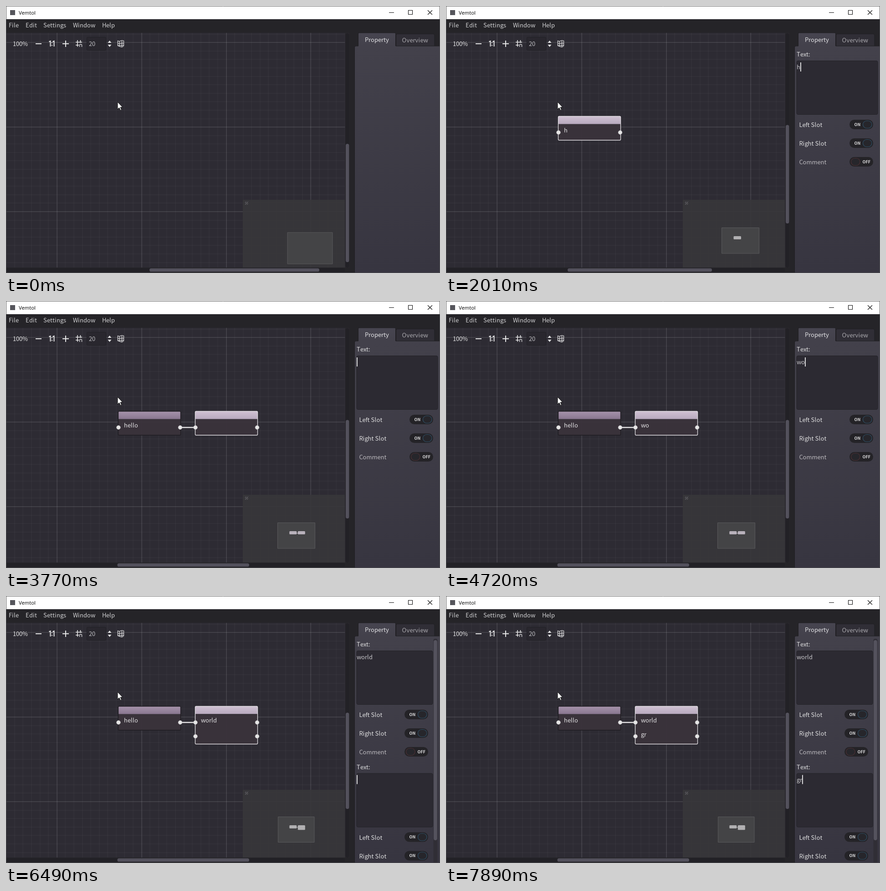
An HTML page with a canvas that plays this animation: 953 px wide and 587 px high, repeating every 8000 ms.

```html
<!DOCTYPE html>
<html lang="en">
<head>
<meta charset="utf-8">
<title>Node editor</title>
<style>
html, body { margin: 0; width: 100%; height: 100%; overflow: hidden; background: #252428; }
canvas { display: block; }
</style>
</head>
<body>
<canvas id="stage" width="953" height="587"></canvas>
<script>
const c = document.getElementById('stage').getContext('2d');
const UI = '"Noto Sans CJK SC", "Noto Sans CJK JP", "Noto Sans", sans-serif';
const LOOP = 8000, GRID = 18.585;
const SECOND_NODE = 3770, SECOND_SLOT = 6490;

// Times at which each letter appears
const words = {
  hello: [2010, 2210, 2350, 2550, 2810],
  world: [4440, 4720, 4920, 5180, 5440],
  gr: [7630, 7890]
};
const typed = (word, t) => word.slice(0, words[word].filter(k => t >= k).length);

function rect(x, y, w, h, fill) {
  c.fillStyle = fill;
  c.fillRect(x, y, w, h);
}

function round(x, y, w, h, r, fill, stroke, line = 1) {
  c.beginPath();
  c.roundRect(x, y, w, h, r);
  if (fill) { c.fillStyle = fill; c.fill(); }
  if (stroke) { c.strokeStyle = stroke; c.lineWidth = line; c.stroke(); }
}

function path(d, stroke, line = 1, fill) {
  const p = new Path2D(d);
  if (fill) { c.fillStyle = fill; c.fill(p); }
  if (stroke) { c.strokeStyle = stroke; c.lineWidth = line; c.stroke(p); }
}

function fade(y0, y1, from, to) {
  const g = c.createLinearGradient(0, y0, 0, y1);
  g.addColorStop(0, from);
  g.addColorStop(1, to);
  return g;
}

// Letters advance by whole pixels; returns the end of the text
function text(str, x, y, color = '#dededf') {
  c.font = '13px ' + UI;
  c.fillStyle = color;
  for (const ch of str) {
    c.fillText(ch, x, y);
    x += Math.round(c.measureText(ch).width);
  }
  return x;
}

function titleBar() {
  rect(0, 0, 953, 29, '#fff');
  rect(9, 9, 11, 11, '#55555b');
  c.font = '11.2px "Noto Sans", "Open Sans", sans-serif';
  c.fillStyle = '#111';
  c.fillText('Vemtol', 28, 19);
  path('M841 14.5h11M883.5 9.5h9v9h-9zM926 9.5l10 9.5M936 9.5l-10 9.5', '#111', 1.1);
}

function menuBar() {
  rect(0, 29, 953, 558, '#252428');
  [['File', 6], ['Edit', 43], ['Settings', 82], ['Window', 147], ['Help', 211]]
    .forEach(([s, x]) => text(s, x, 47, '#cfcfd1'));
}

function grid() {
  rect(1, 59, 743.5, 516, '#2d2b33');
  for (let i = -6; i < 35; i++) {
    const x = 111.8 + i * GRID, y = 80.3 + i * GRID;
    const color = i % 10 ? 'rgba(255,255,255,.05)' : 'rgba(255,255,255,.2)';
    if (x > 1 && x < 744) rect(Math.round(x) - .4, 59, 1, 516, color);
    if (y > 59 && y < 575) rect(1, Math.round(y) - .4, 743.5, 1, color);
  }
}

function toolbar() {
  const ink = '#e6e6e7';
  text('100%', 15, 88, ink);
  path('M65 83h13M124 83h14M131 76v14', ink, 2);
  path('M94.5 78.5l3-1.5v12M102.5 78.5l3-1.5v12', ink, 2);
  path('M100 79.5h2v2h-2zM100 85.5h2v2h-2z', null, 0, ink);
  path('M153 79.5h14M153 86h7M157 75v14.5M163.5 75v6', ink, 1.6);
  path('M161.5 90v-3.5a2.5 2.5 0 0 1 5 0v3.5', '#bdbdc0', 1.6);
  round(177.5, 68.5, 42, 29, 2, '#29272e', '#212025');
  text('20', 182, 88, '#bdbdc0');
  path('M223.5 81l4-5 4 5zM223.5 85l4 5 4-5z', null, 0, ink);
  path('M245.5 76.5q3 2 6 0q3-1.5 7 0v11q-3 4-7 2q-3-1.5-6-2z'
    + 'M245.5 82q3 1.5 6 0.5t7-.5M245.5 86.5q3 1.5 6 .5t7-.5M249.5 77.5v12M254.5 76.5v13', ink, 1.2);
}

function slot(x, y) {
  c.beginPath();
  c.arc(x, y, 4.3, 0, 7);
  c.fillStyle = '#e6e6e6';
  c.fill();
  c.strokeStyle = '#b9b7bb';
  c.lineWidth = .8;
  c.stroke();
}

function node(x, rows, selected) {
  const h = rows.length > 1 ? 83 : 52.5;
  round(x, 242.5, 137, h, 2, 'rgba(58,50,59,.94)');
  round(x, 242.5, 137, 17, [2, 2, 0, 0],
    selected ? fade(243, 260, '#cfc1d2', '#b7a8bd') : fade(243, 260, '#a592aa', '#88768f'));
  if (rows.length > 1) rect(x, 259.7, 137, 1, '#2a252c');
  round(x, 242.5, 137, h, 2, null, selected ? '#dedbdf' : '#1f1d22', 1.4);
  rows.forEach((row, i) => {
    const y = 278 + i * 30.5;
    slot(x + .5, y);
    slot(x + 136, y);
    text(row, x + 12.5, y, '#e0dfe1');
  });
}

function minimap(t) {
  const two = t >= SECOND_NODE, three = t >= SECOND_SLOT;
  rect(520, 426, 224.5, 149, 'rgba(56,55,58,.9)');
  path('M525 436.5l6.5-6M525 432.5l2.5-2M529 436.5l2.5-2.5', '#85848a');
  const view = t < 400 ? [618, 498, 99, 69] : three ? [597.5, 485.5, 79.5, 56]
    : [two ? 596.5 : 605.5, 487.5, 82, 56.5];
  round(...view, 0, '#444446', '#59595b');
  if (t < 400) return;
  const ink = two && !three ? '#b8b1bb' : '#b1b0b2';
  if (!two) return round(631.5, 506, 16.5, 7, 1.5, ink);
  const y = three ? 504 : 506;
  round(622.3, y, 16, 7, 1.5, ink);
  round(640.8, y, 16, three ? 10.3 : 7, 1.5, ink);
  rect(638, y + 4, 3, 1, ink);
}

function scrollbars(t) {
  rect(744.5, 59, 9.5, 516, '#29272d');
  rect(1, 575, 743.5, 11, '#252428');
  round(2, 576.5, 742, 8, 4, '#222126');
  round(745.5, 60, 8, 515, 4, '#222126');
  const [top, high] = t < 400 ? [303, 260] : t < SECOND_SLOT ? [261.5, 216.5] : [256.5, 211.5];
  const [left, wide] = t < 400 ? [315, 373] : t < SECOND_NODE ? [267, 317] : [244.5, 289.5];
  round(746, top, 7.3, high, 3.6, '#53515c');
  round(left, 576.7, wide, 7.3, 3.6, '#53515c');
}

function toggle(x, y, on) {
  round(x, y - 10.5, 52, 21, 10.5, '#242327');
  c.font = 'bold 9px ' + UI;
  c.fillStyle = '#dcdcdd';
  c.fillText(on ? 'ON' : 'OFF', x + (on ? 10.5 : 28.5), y + 3.3);
  round(x + (on ? 29.5 : 3.5), y - 8, 19.5, 16, 8, '#26262b', on ? '#304e64' : '#4b3034', 1.2);
}

function slotForm(str, y, right, focus) {
  text('Text:', 770, y + 5);
  round(770, y + 14.5, right - 770, 118, 3, '#2c2a32', '#232227');
  const end = text(str, 770, y + 33, '#c6c5c9');
  if (focus) rect(str ? end : 770, y + 18, 1.8, 20, '#ededee');
  ['Left Slot', 'Right Slot', 'Comment'].forEach((label, i) => {
    const row = y + 155 + i * 41;
    text(label, 775.5, row + 5, i < 2 ? '#dededf' : '#bab8bd');
    toggle(right - 62, row - .5, i < 2);
  });
}

function panel(t) {
  round(856.5, 61.5, 84.5, 27, [3, 3, 0, 0], '#302e36', '#1f1e22');
  text('Overview', 869.5, 80, '#a9a8ad');
  round(765.5, 88, 187, 500, [3, 0, 0, 0], fade(88, 587, '#43414b', '#373540'), '#1f1e22');
  round(773.5, 59, 82.5, 30, [3, 3, 0, 0], fade(59, 88, '#474550', '#43414b'));
  path('M773.5 88v-27q0-2 2-2h78q2 0 2 2v27', '#1f1e22');
  text('Property', 788, 79, '#e2e2e4');
  if (t < 400) return;
  const both = t >= SECOND_SLOT;
  slotForm(typed(t < SECOND_NODE ? 'hello' : 'world', t), 106, both ? 937 : 948, !both);
  if (!both) return;
  slotForm(typed('gr', t), 375.5, 937, true);
  round(938.5, 94, 9, 494, 4, '#302e36');
  round(939.2, 97, 7.5, 440, 3.7, '#55535e');
}

function draw(now) {
  const t = now % LOOP;
  titleBar();
  menuBar();
  grid();
  if (t >= SECOND_NODE) path('M383 278h33', '#e2e1e3', 2.6);
  if (t >= 400) node(246.5, [typed('hello', t)], t < SECOND_NODE);
  if (t >= SECOND_NODE) {
    const rows = [typed('world', t)];
    if (t >= SECOND_SLOT) rows.push(typed('gr', t));
    node(415.5, rows, true);
  }
  minimap(t);
  toolbar();
  scrollbars(t);
  panel(t);
  path('M.5 29V0M0 .5h953M952.5 0v29', '#6a6a6a');
  path('M.5 29v557.5h952V29', '#4e4e52');
  path('M245 211v16l3.7-3.4 2.5 5.8 2.4-1-2.4-5.7h4.9z', '#111', 1, '#fff');
  requestAnimationFrame(draw);
}
requestAnimationFrame(draw);
</script>
</body>
</html>
```
